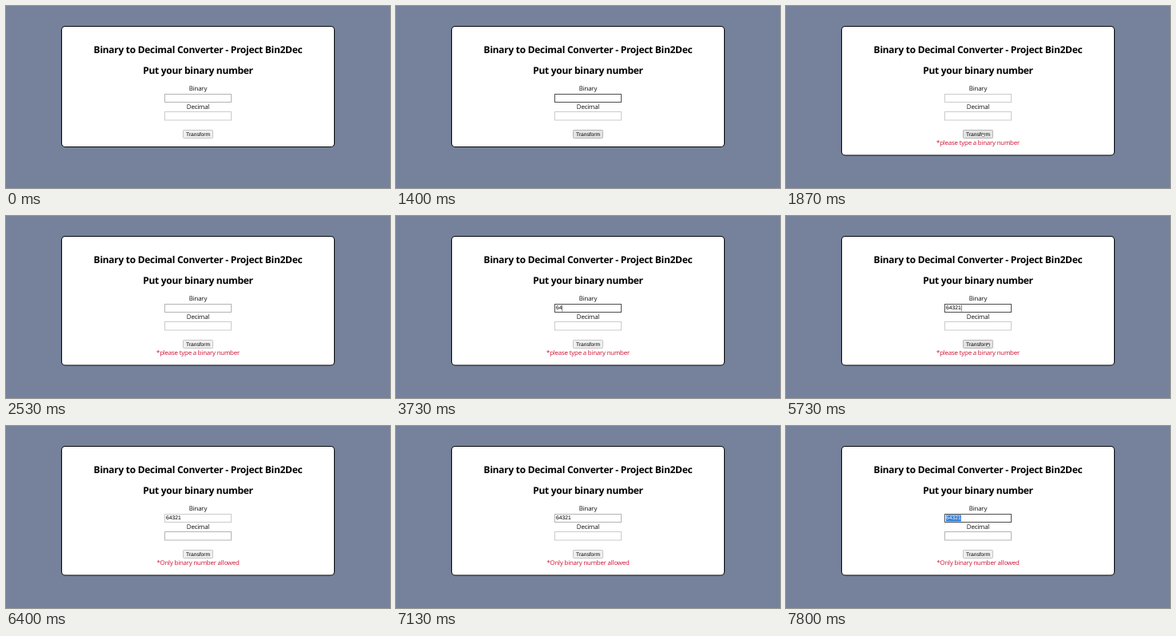
Write an HTML page that moves like this. It is 480x228 px and loops after 8 s.

```html
<!DOCTYPE html>
<html lang="en">
<head>
<meta charset="utf-8">
<title>Binary to Decimal Converter</title>
<style>
  html, body { margin: 0; width: 100%; height: 100%; overflow: hidden; background: #76829b; }
  svg { display: block; width: 480px; height: 228px; }
  text {
    font: 7.9px "Open Sans", "Noto Sans", sans-serif; letter-spacing: -.2px;
    fill: #111; text-anchor: middle; text-rendering: geometricPrecision;
  }
  .head { font-size: 12px; font-weight: 700; letter-spacing: -.29px; fill: #000; }
  .ui { font: 6.67px "Liberation Sans", Arial, sans-serif; letter-spacing: 0; fill: #000; }
  .value { font-size: 6.8px; text-anchor: start; }
  .field { fill: #fff; stroke: #cbcbcb; }
  .field.hover { stroke: #b4b4b4; }
  .field.focus { stroke: #505050; }
  #button { fill: #efefef; stroke: #c6c6c6; }
  #button.hover { fill: #e4e4e4; stroke: #b6b6b6; }
  #error { fill: #cf1232; }
  #marked { fill: #fff; }
</style>
</head>
<body>
<svg viewBox="0 0 480 228">
  <defs>
    <clipPath id="markClip"><rect id="markArea" y="110" height="11"/></clipPath>
  </defs>
  <rect id="card" x="69.5" y="25.5" width="341" rx="4.5" fill="#fff" stroke="#05070c" stroke-width="1.1"/>
  <text class="head" x="240" y="59.2">Binary to Decimal Converter - Project Bin2Dec</text>
  <text class="head" x="240" y="85.2">Put your binary number</text>

  <text x="240" y="106.3">Binary</text>
  <rect id="binary" class="field" x="198.5" y="110.5" width="83" height="10"/>
  <text id="value" class="ui value" x="200" y="117.4"></text>
  <rect id="mark" y="111.5" height="8" fill="#2f7fdc"/>
  <text id="marked" class="ui value" x="200" y="117.4" clip-path="url(#markClip)"></text>
  <rect id="caret" y="111.5" width=".6" height="8" fill="#333"/>

  <text x="240" y="129.2">Decimal</text>
  <rect id="decimal" class="field" x="198.5" y="132.5" width="83" height="10.5"/>

  <rect id="button" x="221.5" y="155.5" width="37" height="10" rx=".8"/>
  <text class="ui" x="240" y="162.8">Transform</text>
  <text id="error" x="240" y="174.4"></text>

  <path id="hand" d="M1 3.1V.6Q1.4 0 1.8.6V2L3.6 2.4Q4.2 2.6 4.1 3.2L3.7 5.1H1.5L.2 3.4Q.2 2.7 1 3.1Z"
        fill="#fff" stroke="#333" stroke-width=".4" stroke-linejoin="round"/>
</svg>
<script>
  const LOOP = 8000, BLINK = 533, LEFT = 200, DIGIT = 3.78;
  const $ = id => document.getElementById(id);
  const set = (id, attrs) => {
    for (const k in attrs) $(id).setAttribute(k, attrs[k]);
  };
  const within = (t, spans) => spans.some(([a, b]) => t >= a && t < b);
  const show = (id, on) => set(id, { visibility: on ? "visible" : "hidden" });

  const typed = [3530, 3730, 4000, 4070, 4270];
  const marks = [7530, 7600, 7670, 7730, 7800];
  const focus = [[530, 1670], [2730, 5800], [7270, LOOP]];
  const caretResets = [530, 2730, ...typed, 7270];
  const hover = {
    binary: [[0, 1130], [2530, 4930], [7000, 7670]],
    decimal: [[1130, 1270], [2430, 2530], [6270, 7000], [7670, LOOP]],
    button: [[1330, 2400], [5200, 6200]]
  };
  // time, x, y of the pointing hand
  const visits = [
    [[1470, 246, 160], [1600, 244, 158.5], [2130, 244, 158.5], [2400, 243, 154]],
    [[5270, 247, 156], [5530, 250.5, 158.8], [6000, 250.5, 158.8], [6200, 249, 154]]
  ];

  function along(path, t) {
    const i = path.findIndex(p => p[0] > t), a = path[i - 1], b = path[i];
    const u = (t - a[0]) / (b[0] - a[0]), s = u * u * (3 - 2 * u);
    return [a[1] + (b[1] - a[1]) * s, a[2] + (b[2] - a[2]) * s];
  }

  function draw(t) {
    const count = list => list.filter(at => t >= at).length;
    const digits = count(typed), picked = count(marks);
    const focused = within(t, focus);

    for (const id in hover) {
      $(id).classList.toggle("hover", within(t, hover[id]));
    }
    $("binary").classList.toggle("focus", focused);

    const text = "64321".slice(0, digits);
    $("value").textContent = $("marked").textContent = text;

    const end = LEFT + digits * DIGIT;
    const area = { x: end - picked * DIGIT, width: picked * DIGIT };
    set("mark", area);
    set("markArea", area);

    const since = t - Math.max(...caretResets.filter(at => at <= t));
    show("caret", focused && !picked && Math.floor(since / BLINK) % 2 === 0);
    set("caret", { x: end });

    set("card", { height: t < 1870 ? 151 : 161.5 });
    $("error").textContent = t < 1870 ? ""
      : t < 5930 ? "*please type a binary number" : "*Only binary number allowed";

    const visit = visits.find(v => t >= v[0][0] && t < v[v.length - 1][0]);
    show("hand", !!visit);
    if (visit) set("hand", { transform: `translate(${along(visit, t)})` });
  }

  const start = performance.now();
  function tick() {
    draw((performance.now() - start) % LOOP);
    requestAnimationFrame(tick);
  }
  tick();
</script>
</body>
</html>
```
